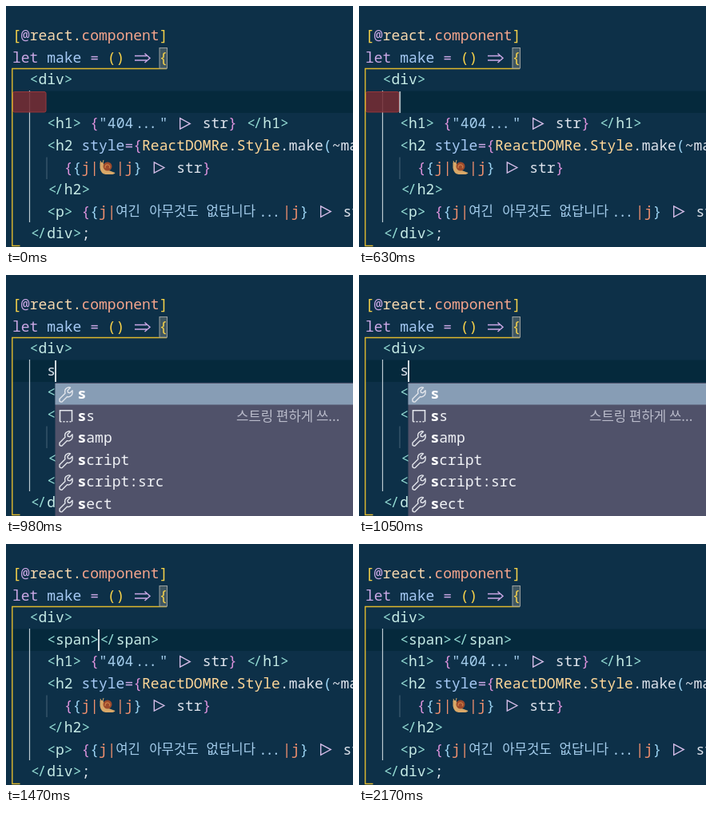
These frames come from a looping animation (434 px wide and 302 px high, 2520 ms). An HTML page:

```html
<!DOCTYPE html>
<html lang="en">
<head>
<meta charset="utf-8">
<title>Editor completion</title>
<style>
  html, body { margin: 0; width: 100%; height: 100%; overflow: hidden; background: #0d3048; }
  svg { display: block; width: 434px; height: 302px; }
  text { font: 500 18px "Noto Sans Mono", "DejaVu Sans Mono", "Noto Sans CJK KR", "Noto Sans CJK", monospace; white-space: pre; }
  .ko { font: 16.76px "Noto Sans CJK KR", "Noto Sans CJK", sans-serif; }
  .bold { font-weight: 700; }
</style>
</head>
<body>
<svg id="stage" viewBox="0 0 434 302"></svg>
<script>
const LOOP = 2520, STEP = 70, CHAR = 10.8, LEFT = 8, ROW = 27.55;
const TYPE_START = 980, KEY_GAP = 105, WORD = 'span';
const COLORS = {
  plain: '#dde3ec', key: '#cba8e6', gold: '#f7d24a', pink: '#dc92dc', sky: '#9bd3f2',
  tag: '#93dbd3', name: '#c6ebe6', root: '#f8d9ae', decor: '#f5a58c', module: '#ffd798',
  func: '#a6caf5', text: '#a4cdec', mark: '#ef8f6e'
};
const stage = document.getElementById('stage');
const colX = col => LEFT + col * CHAR;
const midY = row => 37 + row * ROW;

function add(parent, tag, attrs = {}, content = '') {
  const node = document.createElementNS('http://www.w3.org/2000/svg', tag);
  for (const key in attrs) node.setAttribute(key, attrs[key]);
  node.textContent = content;
  parent.appendChild(node);
  return node;
}
const rect = (parent, x, y, width, height, fill, more) =>
  add(parent, 'rect', { x, y, width, height, fill, ...more });
const path = (parent, d, stroke, width = 1.4, more) =>
  add(parent, 'path', { d, stroke, fill: 'none', 'stroke-width': width, ...more });

// Horizontal nudges that imitate ligatures; each list ends with the way back.
const LIGATURES = { '</': [1.5, -2.5, 1], '...': [2.5, -2.5, -2.5, 2.5] };

// Tokens alternate: colour name, text.
function code(parent, x, row, ...tokens) {
  const line = add(parent, 'text', { x, y: midY(row) + 6.2 });
  let shift = 0;
  const span = (color, content, dx = 0) => {
    add(line, 'tspan', { fill: COLORS[color], dx: dx + shift }, content);
    shift = 0;
  };
  for (let i = 0; i < tokens.length; i += 2) {
    const [color, content] = [tokens[i], tokens[i + 1]];
    const nudges = LIGATURES[content];
    if (nudges) {
      [...content].forEach((char, n) => span(color, char, nudges[n]));
      shift = nudges[content.length];
    } else span(color, content);
  }
  return line;
}
const open = name => ['tag', '<', 'name', name, 'tag', '>'];
const close = name => ['tag', '</', 'name', name, 'tag', '>'];
const pipe = (x, row) =>
  path(stage, `M${x + 4.5} ${midY(row) - 6.5}l12.5 6.700l-12.5 6.700z`, '#d5bde8');

// Editor background, guides and bracket scope
rect(stage, 0, 0, 434, 302, '#0d3048');
rect(stage, 8, 106.5, 426, 27.5, '#05293c');
path(stage, 'M29.500 106V271', '#bccbd2', 1.2);
const blank = rect(stage, 8.5, 107.5, 41.5, 25.5, '#752d35',
  { stroke: '#97393e', rx: 2, 'fill-opacity': 0.88 });
path(stage, 'M51 189.500V217', '#496578', 1);
path(stage, 'M201 78.500H7.800V300.500H17.500', '#dfb92e', 1.4);
rect(stage, 192, 52.5, 9.5, 25.5, '#405762', { stroke: '#9a9f9e' });

// Source text
code(stage, colX(0), 0, 'gold', '[', 'key', '@', 'root', 'react.', 'decor', 'component', 'gold', ']');
code(stage, colX(0), 1, 'key', 'let ', 'func', 'make ', 'key', '= ', 'gold', '()    {');
path(stage, 'M161 62.500H176M161 68H176M173.500 59.500L180 65.250L173.500 71', COLORS.key, 1.5);
code(stage, colX(2), 2, ...open('div'));
code(stage, colX(4), 4, ...open('h1'), 'pink', ' {', 'text', '"404', 'text', '...', 'text', '"',
  'plain', '    str', 'pink', '} ', ...close('h1'));
pipe(colX(19), 4);
code(stage, colX(4), 5, 'tag', '<', 'name', 'h2 ', 'func', 'style', 'key', '=', 'pink', '{',
  'module', 'ReactDOMRe', 'plain', '.', 'module', 'Style', 'plain', '.make', 'sky', '(', 'plain', '~make');
code(stage, colX(6), 6, 'pink', '{', 'sky', '{', 'mark', 'j|  |j', 'sky', '}', 'plain', '    str', 'pink', '}');
pipe(colX(16), 6);
code(stage, colX(4), 7, ...close('h2'));
code(stage, colX(4), 8, ...open('p'), 'pink', ' {', 'sky', '{', 'mark', 'j|');
[['여긴', 137.2], ['아무것도', 179.2], ['없답니다', 250.5]].forEach(([word, x]) =>
  add(stage, 'text', { x, y: midY(8) + 6, fill: COLORS.text, class: 'ko' }, word));
code(stage, 313.4, 8, 'text', '. . .'.replaceAll(' ', ''), 'mark', '|j', 'sky', '}', 'plain', '    str');
pipe(389.2, 8);
code(stage, colX(2), 9, ...close('div'), 'plain', ';');

// Snail
path(stage, 'M117.500 196q4-1 5 3q1 6 6 7l8 3q-1 2-5 2h-7q-6-1-7-8z', 'none', 0, { fill: '#d9a868' });
add(stage, 'circle', { cx: 127, cy: 201, r: 5.5, fill: '#9c4a2c' });
path(stage, 'M124 203q0-5 4-4q3 2 1 4', '#cf8048', 1.2);
path(stage, 'M119 197l-1-3M121 197l1-4', '#d9a868', 1);

// Typed line, caret and completion list
const typed = code(stage, colX(4), 3, 'plain', '');
const expanded = code(stage, colX(4), 3, ...open(WORD), ...close(WORD));
const caret = rect(stage, 0, 107, 1.8, 27, '#e8edf0');

function wrench(parent, x, y) {
  path(parent, `M${x + 1.5} ${y + 6}l7-7q-1.500-5 3-7q2-1 3.500 0l-3.500 3.500l.5 2.500l2.500 .5l3-3`
    + `q1 6-3 7.500q-2 1-3.500 .3l-6.500 6.500q-2 .5-3-1z`, '#e3e6ec', 1.4, { 'stroke-linejoin': 'round' });
}
function popup(prefix, items) {
  const group = add(stage, 'g'), x = colX(4 + prefix.length) - 0.5;
  rect(group, x, 135, 434 - x, items.length * ROW + 2, '#50526a');
  rect(group, x, 136, 434 - x, 26.5, '#879db5');
  items.forEach((item, i) => {
    const y = midY(i + 4) + 2;
    if (item === 'ss') {
      path(group, `M${x + 6} ${y + 7}v-14h15v14`, '#e3e6ec', 1.6);
      path(group, `M${x + 6} ${y + 7}h15`, '#e3e6ec', 1.6, { 'stroke-dasharray': '2 2' });
      add(group, 'text', { x: 288, y: y + 6, fill: '#babccb', class: 'ko' }, '스트링 편하게 쓰...');
    } else wrench(group, x + 4, y);
    const label = add(group, 'text', { x: x + 28, y: y + 6, fill: '#f0f2f6' });
    add(label, 'tspan', { class: 'bold', fill: '#fff' }, prefix);
    add(label, 'tspan', {}, item.slice(prefix.length));
  });
  return group;
}
const popups = {};
for (let n = 1; n <= WORD.length; n++) {
  const prefix = WORD.slice(0, n);
  popups[prefix] = popup(prefix, n > 1 ? [WORD] : ['s', 'ss', 'samp', 'script', 'script:src', 'sect']);
}

const show = (node, on) => node.setAttribute('display', on ? 'inline' : 'none');
function ease(t, from, to) {
  const p = Math.min(1, Math.max(0, (t - from) / (to - from)));
  return p * p * (3 - 2 * p);
}
function render(time) {
  const t = Math.floor((time % LOOP) / STEP) * STEP;
  const keys = Math.max(0, Math.floor((t - TYPE_START) / KEY_GAP) + 1);
  const done = keys > WORD.length;
  const word = done ? '' : WORD.slice(0, keys);
  typed.firstChild.textContent = word;
  show(expanded, done);
  show(blank, keys === 0);
  for (const prefix in popups) show(popups[prefix], prefix === word);
  caret.setAttribute('x', colX(done ? 10 : 4 + word.length) - 0.9);
  caret.setAttribute('opacity', keys === 0
    ? ease(t, 40, 400) * (1 - ease(t, 500, 900))
    : 1 - ease(t, 2000, 2170));
}

const start = performance.now();
function tick() {
  render(performance.now() - start);
  requestAnimationFrame(tick);
}
tick();
</script>
</body>
</html>
```
